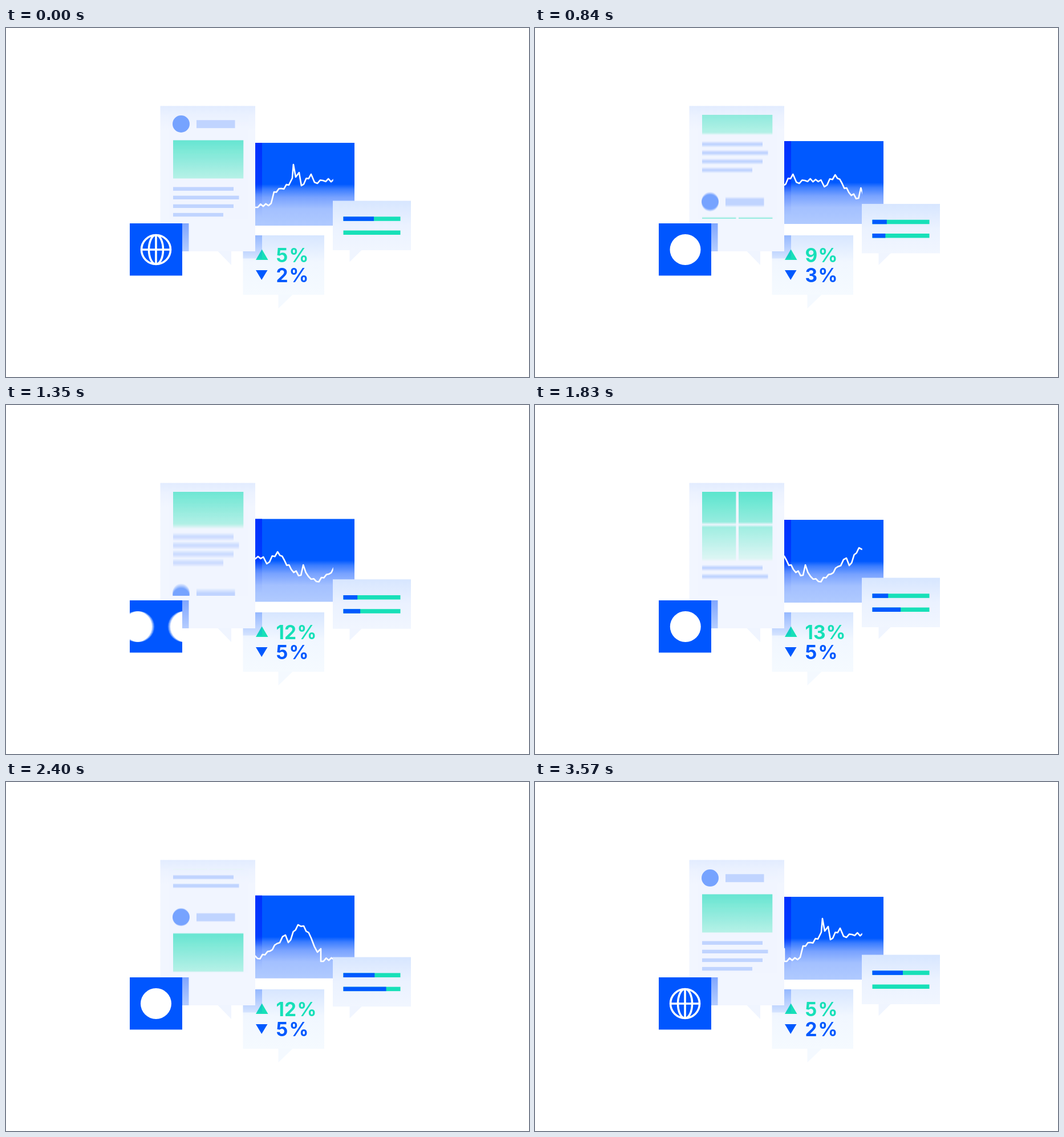
Animation of 917 by 611 pixels, one loop 3.6 s. Source, as an HTML page with a canvas:

```html
<!DOCTYPE html>
<html lang="en">
<head>
<meta charset="utf-8">
<title>Insights</title>
<style>
html, body { margin: 0; width: 100%; height: 100%; overflow: hidden; background: #fff; }
canvas { display: block; width: 917px; height: 611px; }
</style>
</head>
<body>
<canvas id="stage" width="917" height="611"></canvas>
<script>
const stage = document.getElementById('stage').getContext('2d');
const layer = new OffscreenCanvas(917, 611).getContext('2d');
let ctx = stage;

const LOOP = 3600, BLUE = '#0059ff', TEAL = '#17e0b8', PALE = '#c1d4ff';
const CHART_PERIOD = 351, CHART_SPEED = 0.0983, FEED_PERIOD = 450.5, ICON_GAP = 82;

const clamp = (v, lo, hi) => Math.min(hi, Math.max(lo, v));
const wave = (t, period) => (1 - Math.cos(2 * Math.PI * t / period)) / 2;

function seeded(seed) {
  return () => (seed = seed * 16807 % 2147483647) / 2147483647;
}

// Turning points of the chart; wide gaps are roughened with small zigzags
const turns = [
  [437, 314], [465, 307], [470, 287], [483, 281], [496, 275], [502, 263], [504, 239], [508, 261],
  [514, 253], [518, 276], [535, 256], [541, 270], [556, 267], [584, 266], [590, 278], [609, 257],
  [621, 272], [633, 288], [650, 298], [654, 280], [663, 300], [677, 309], [699, 296], [711, 283],
  [726, 268], [731, 281], [748, 250], [758, 252], [771, 273], [782, 298], [788, 292]
];
const chart = roughen(turns, seeded(7));

function roughen(points, random) {
  return points.flatMap(([x, y], i) => {
    const [nextX, nextY] = points[i + 1] || [x, y];
    const parts = Math.max(1, Math.round((nextX - x) / 4.5));
    return Array.from({ length: parts }, (_, k) => {
      const bump = k ? (k % 2 ? 1 : -1) * (1 + 2.5 * random()) : 0;
      return [x + (nextX - x) * k / parts, y + (nextY - y) * k / parts + bump];
    });
  });
}

// Cubic bezier easing with control points (x1, 0) and (x2, 1)
function bezier(x1, x2, p) {
  let lo = 0, hi = 1, u;
  for (let i = 0; i < 24; i++) {
    u = (lo + hi) / 2;
    const x = 3 * (1 - u) ** 2 * u * x1 + 3 * (1 - u) * u * u * x2 + u ** 3;
    if (x < p) lo = u; else hi = u;
  }
  return u * u * (3 - 2 * u);
}

// Eased interpolation between [time, value] keys
function keyed(t, keys) {
  let i = 1;
  while (i < keys.length - 1 && keys[i][0] < t) i++;
  const [t0, a] = keys[i - 1], [t1, b] = keys[i];
  return a + (b - a) * wave(clamp((t - t0) / (t1 - t0), 0, 1), 2);
}

function fade(y0, y1, ...stops) {
  const g = ctx.createLinearGradient(0, y0, 0, y1);
  stops.forEach(([at, color]) => g.addColorStop(at, color));
  return g;
}

function box(x0, y0, x1, y1, fill) {
  ctx.fillStyle = fill;
  ctx.fillRect(x0, y0, x1 - x0, y1 - y0);
}

function poly(fill, ...pts) {
  ctx.fillStyle = fill;
  ctx.beginPath();
  pts.forEach(([x, y]) => ctx.lineTo(x, y));
  ctx.fill();
}

function disc(x, y, r, fill) {
  ctx.fillStyle = fill;
  ctx.beginPath();
  ctx.arc(x, y, r, 0, 7);
  ctx.fill();
}

function clipped(x0, y0, x1, y1, draw) {
  ctx.save();
  ctx.beginPath();
  ctx.rect(x0, y0, x1 - x0, y1 - y0);
  ctx.clip();
  draw();
  ctx.restore();
}

// Averages opaque pictures of one window over a short shutter time
function motionBlur(t, x0, y0, x1, y1, draw) {
  const samples = 10, shutter = 16, w = x1 - x0, h = y1 - y0;
  for (let i = 0; i < samples; i++) {
    ctx = layer;
    clipped(x0, y0, x1, y1, () =>
      draw(clamp(t + ((i + 0.5) / samples - 0.5) * shutter, 0, LOOP)));
    ctx = stage;
    ctx.globalAlpha = 1 / (i + 1);
    ctx.drawImage(layer.canvas, x0, y0, w, h, x0, y0, w, h);
  }
  ctx.globalAlpha = 1;
}

function chartCard(t) {
  const y = 201 - 3 * wave(t, 1800);
  box(430, y, 611, y + 145, fade(y, y + 145,
    [0, BLUE], [0.5, BLUE], [0.56, '#3b7dff'], [0.66, '#78a2ff'], [0.8, '#a3c0ff'], [1, '#b0caff']));
  box(437, y, 449, y + 145, fade(y, y + 145,
    [0, 'rgba(0,48,255,1)'], [0.48, 'rgba(0,48,255,.7)'], [0.62, 'rgba(0,48,255,.12)'], [0.9, 'rgba(0,48,255,0)']));
  clipped(430, 190, 573.7, 350, () => {
    ctx.beginPath();
    for (const start of [0, CHART_PERIOD])
      chart.forEach(([x, py]) => ctx.lineTo(x + start - t * CHART_SPEED, py));
    ctx.strokeStyle = '#fff';
    ctx.lineWidth = 2.6;
    ctx.lineJoin = 'round';
    ctx.stroke();
  });
}

function barsCard(t) {
  const y = 302.5 + 5.5 * wave(t, 1800);
  box(573, y, 710, y + 86.5, fade(y, y + 86.5, [0, '#d7e6ff'], [0.5, '#ebf2ff'], [1, '#f1f6ff']));
  poly('#f0f5ff', [602.5, y + 86], [602.5, y + 107], [624, y + 86]);
  const bar = (top, width) => {
    box(591.5, top, 691.5, top + 7.5, TEAL);
    box(591.5, top, 591.5 + width, top + 7.5, BLUE);
  };
  bar(y + 27.8, keyed(t, [[0, 53.5], [900, 25], [1600, 24.5], [3000, 74], [3570, 53.5]]));
  bar(y + 52, keyed(t, [[0, 0], [980, 24], [2830, 82.5], [3570, 0]]));
}

function statsCard(t) {
  box(415.5, 363, 558, 467, fade(363, 467, [0, '#d7e6ff'], [0.45, '#f1f7ff'], [1, '#f5faff']));
  poly('#f4f9ff', [477.5, 466.5], [477.5, 491], [503, 466.5]);
  poly(TEAL, [448.7, 387.5], [459.5, 406], [438, 406]);
  poly(BLUE, [438, 424], [458.5, 424], [448.2, 441]);
  box(415.5, 363, 449, 403.5, fade(363, 403.5, [0, 'rgba(0,80,255,.3)'], [1, 'rgba(0,80,255,.1)']));
  ctx.font = '700 33.5px Inter, sans-serif';
  const percent = (value, baseline, color) => {
    ctx.fillStyle = color;
    ctx.fillText(value, 473.5, baseline);
    ctx.fillText('%', value > 9 ? 510.5 : 496.5, baseline);
  };
  percent(Math.floor(Math.min(5 + t / 190, 13, 5 + (3585 - t) / 165)), 409.7, TEAL);
  percent(Math.floor(clamp(Math.min(2 + (t - 240) / 360, 2 + (3720 - t) / 420), 2, 5)), 445.2, BLUE);
}

// A post is placed by the centre of its avatar
function postHeader(y) {
  disc(307, y, 15, '#7aa5ff');
  box(334, y - 6.7, 401.5, y + 7.3, PALE);
}

function postLines(y, ends) {
  ends.forEach((x, i) => box(293, y + 15.1 * i - 3.2, x, y + 15.1 * i + 3.2, PALE));
}

function imagePost(y) {
  postHeader(y);
  box(293, y + 28.5, 416.3, y + 95.5, fade(y + 28.5, y + 95.5, [0, '#6ae6d2'], [1, '#b8f1e8']));
  postLines(y + 113.7, [399, 408.5, 399, 381]);
}

function galleryPost(y) {
  postHeader(y);
  const fill = fade(y + 28.5, y + 152, [0, '#5ae5cd'], [1, '#e0f6f5']);
  for (const x of [293, 357])
    for (const dy of [28.5, 92.5]) box(x, y + dy, x + 59.4, y + dy + 59.5, fill);
  postLines(y + 166, [399, 408.5]);
}

// A short scroll and return, then one long sweep through the feed
const scrollAt = t => t < 1200
  ? 120 * wave(t, 1200)
  : FEED_PERIOD * bezier(0.1, 0.14, (t - 1200) / 2400);

function feedCard(t) {
  const paper = () => fade(136.5, 391, [0, '#e2ecff'], [0.07, '#ecf2ff'], [0.17, '#f2f6ff'], [1, '#f2f6ff']);
  box(270.5, 136.5, 437, 391, paper());
  poly('#f0f5ff', [371, 390.5], [395, 390.5], [395, 415]);
  motionBlur(t, 285, 152, 425, 334, time => {
    const y = 168 - scrollAt(time);
    box(285, 152, 425, 334, paper());
    imagePost(y);
    galleryPost(y + 214.5);
    imagePost(y + FEED_PERIOD);
  });
  box(309, 342, 320.5, 391, fade(342, 391, [0, '#80a6ff'], [1, '#b5cdff']));
}

function globe(x, y) {
  ctx.strokeStyle = '#fff';
  ctx.lineWidth = 3.6;
  ctx.beginPath();
  ctx.arc(x, y, 25.5, 0, 7);
  ctx.moveTo(x + 12.5, y);
  ctx.ellipse(x, y, 12.5, 25.5, 0, 0, 7);
  ctx.moveTo(x - 25, y);
  ctx.lineTo(x + 25, y);
  ctx.moveTo(x, y - 25);
  ctx.lineTo(x, y + 25);
  ctx.stroke();
}

// Quick slide with a slow drift at the end of each third of the loop
function slideAt(t) {
  const step = Math.min(2, Math.floor(t / 1200)), p = t / 1200 - step;
  return step + 0.98 * (1 - Math.exp(-((p / 0.172) ** 2.2))) + 0.02 * p;
}

function iconTile(t) {
  box(217, 342, 309, 433.5, BLUE);
  motionBlur(t, 217, 343, 309, 433, time => {
    const x = 263 - ICON_GAP * slideAt(time);
    box(217, 343, 309, 433, BLUE);
    globe(x, 388);
    disc(x + ICON_GAP, 388, 27, '#fff');
    disc(x + 2 * ICON_GAP, 388, 27, '#fff');
    globe(x + 3 * ICON_GAP, 388);
  });
}

function frame() {
  const t = performance.now() % LOOP;
  box(0, 0, 917, 611, '#fff');
  [chartCard, barsCard, statsCard, feedCard, iconTile].forEach(draw => draw(t));
  requestAnimationFrame(frame);
}
frame();
</script>
</body>
</html>
```
